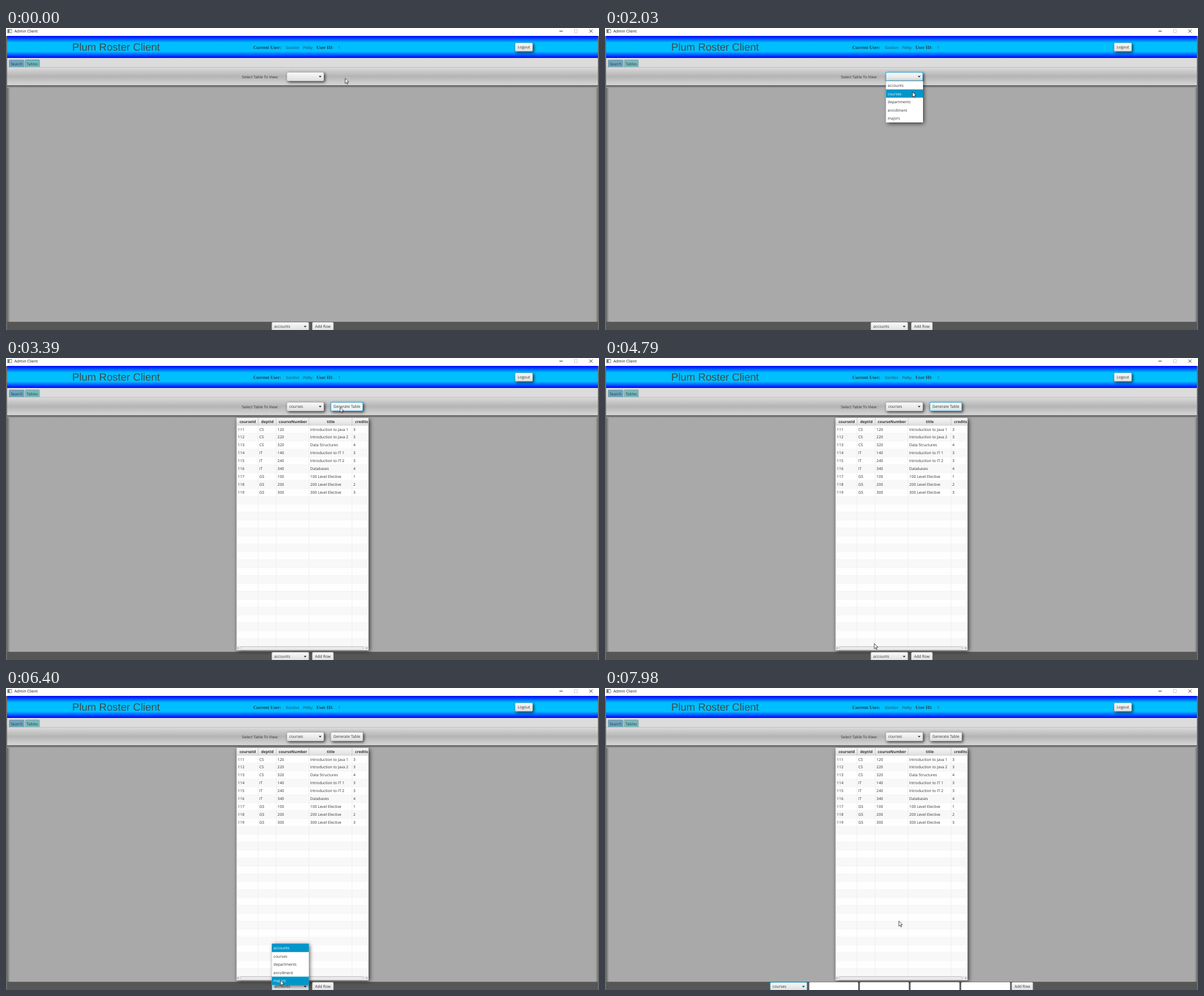
Write an HTML page with a canvas that moves like this. It is 1048 px wide and 534 px high and loops after 8 s.

```html
<!DOCTYPE html>
<html lang="en">
<head>
<meta charset="utf-8">
<title>Admin Client</title>
<style>
  html, body { margin: 0; width: 100%; height: 100%; overflow: hidden; background: #a9a9a9; }
  canvas { display: block; width: 1048px; height: 534px; }
</style>
</head>
<body>
<canvas id="stage" width="1048" height="534"></canvas>
<script>
const ctx = document.getElementById('stage').getContext('2d');
const LOOP = 8000;
const SANS = '"Open Sans", "Noto Sans", sans-serif';
const UI = `6.75px ${SANS}`;
const BOLD = `bold 6.7px ${SANS}`;
const SERIF = 'bold 8.15px "Liberation Serif", serif';
const BLUE = '#0096c9';
const INK = '#333';

const CLICK = { openTop: 1400, pickTop: 2380, generate: 3220, openBottom: 5820, pickBottom: 7190 };

// Pointer waypoints: time, x, y
const PATH = [
  [0, 599, 88.5], [620, 599, 88.5], [1180, 549, 87], [1750, 549, 87], [2020, 543, 112.5],
  [2300, 542, 114], [2570, 542, 114], [3000, 590, 86.5], [3400, 590, 86.5],
  [3960, 432, 263], [3990, 428, 267], [4260, 428, 267], [4790, 475.5, 504.5],
  [5030, 477, 519], [5110, 477, 519], [5500, 482.5, 526], [6200, 482.5, 526],
  [6900, 493.5, 478], [7250, 493.5, 478], [7650, 520, 468], [7950, 527, 441],
  [7980, 519, 411.5], [8000, 519, 411.5]
];
const TABLES = ['accounts', 'courses', 'departments', 'enrollment', 'majors'];
const COLUMNS = [
  { name: 'courseId', x: 408, w: 38 }, { name: 'deptId', x: 446, w: 32 },
  { name: 'courseNumber', x: 478, w: 58 }, { name: 'title', x: 536, w: 76 },
  { name: 'credits', x: 612, w: 33 }
];
const COURSES = [
  ['CS', 120, 'Introduction to Java 1', 3], ['CS', 220, 'Introduction to Java 2', 3],
  ['CS', 320, 'Data Structures', 4], ['IT', 140, 'Introduction to IT 1', 3],
  ['IT', 240, 'Introduction to IT 2', 3], ['IT', 340, 'Databases', 4],
  ['GS', 100, '100 Level Elective', 1], ['GS', 200, '200 Level Elective', 2],
  ['GS', 300, '300 Level Elective', 3]
];

function rect(x, y, w, h, fill) {
  ctx.fillStyle = fill;
  ctx.fillRect(x, y, w, h);
}

function round(x, y, w, h, r, fill) {
  ctx.fillStyle = fill;
  ctx.beginPath();
  ctx.roundRect(x, y, w, h, r);
  ctx.fill();
}

function gradient(x0, y0, x1, y1, ...stops) {
  const g = ctx.createLinearGradient(x0, y0, x1, y1);
  stops.forEach(([at, color]) => g.addColorStop(at, color));
  return g;
}

function text(label, x, y, font = UI, color = INK, align = 'left') {
  ctx.font = font;
  ctx.fillStyle = color;
  ctx.textAlign = align;
  ctx.fillText(label, x, y);
}

function polygon(points, fill, stroke) {
  ctx.beginPath();
  points.forEach(([x, y]) => ctx.lineTo(x, y));
  ctx.closePath();
  if (fill) { ctx.fillStyle = fill; ctx.fill(); }
  if (stroke) { ctx.strokeStyle = stroke; ctx.stroke(); }
}

function line(x0, y0, x1, y1, color, width = 1) {
  ctx.strokeStyle = color;
  ctx.lineWidth = width;
  ctx.beginPath();
  ctx.moveTo(x0, y0);
  ctx.lineTo(x1, y1);
  ctx.stroke();
}

function withShadow(blur, offset, draw) {
  ctx.save();
  ctx.shadowColor = 'rgba(0,0,0,.7)';
  ctx.shadowBlur = blur;
  ctx.shadowOffsetX = ctx.shadowOffsetY = offset;
  draw();
  ctx.restore();
}

function control(x, y, w, h, { focus = false, shadow = false, hover = false } = {}) {
  const border = () => round(x, y, w, h, 2, focus ? '#039ed3' : '#b5b5b5');
  if (shadow) withShadow(5, 2, border); else border();
  const bottom = hover ? '#ececec' : '#dedede';
  round(x + 0.8, y + 0.8, w - 1.6, h - 1.6, 1.5, gradient(0, y, 0, y + h, [0, '#fafafa'], [1, bottom]));
}

function button(label, x, y, w, h, options) {
  control(x, y, w, h, options);
  text(label, x + w / 2, y + (h > 15 ? 10.3 : 10), UI, INK, 'center');
}

function combo(label, x, y, h, options) {
  control(x, y, 66, h, options);
  text(label, x + 4.5, y + 10.2);
  const ax = x + 59.2, ay = y + 6.7;
  polygon([[ax - 2.5, ay], [ax + 2.5, ay], [ax, ay + 2.8]], INK);
}

function popup(x, y, mouse, selected) {
  const rowH = 14.6, w = 65.5;
  withShadow(7, 2, () => rect(x, y, w, rowH * TABLES.length, '#fff'));
  line(x + 0.2, y, x + 0.2, y + 73, '#c8c8c8', 0.5);
  const inside = mouse.x >= x && mouse.x <= x + w;
  const hovered = inside ? Math.floor((mouse.y - y) / rowH) : -1;
  TABLES.forEach((name, i) => {
    const lit = i === hovered || i === selected;
    const top = y + i * rowH;
    if (lit) rect(x, top, w, rowH, BLUE);
    if (lit && i === selected) line(x, top + rowH, x + w, top + rowH, '#0a86b4', 0.6);
    text(name, x + 3, top + 9.9, UI, lit ? '#fff' : INK);
  });
}

function drawTitleBar() {
  rect(0, 0, 1048, 14, '#fff');
  rect(2.5, 2, 8, 7, '#777');
  rect(3.2, 3.2, 6.6, 5.1, '#f4f4f4');
  rect(3.2, 3.2, 3, 5.1, '#557b78');
  text('Admin Client', 14.7, 7.7, `6.9px ${SANS}`, '#111');
  line(978, 5.5, 984, 5.5, '#222', 0.9);
  ctx.strokeStyle = '#c8c8c8';
  ctx.strokeRect(1004.5, 2.8, 5.2, 5.2);
  line(1031, 2.7, 1036.6, 8.3, '#222', 0.9);
  line(1036.6, 2.7, 1031, 8.3, '#222', 0.9);
}

function drawHeader() {
  rect(0, 13, 1048, 521, '#6c6c6c');
  rect(2, 14, 1044, 39, gradient(0, 14, 0, 53,
    [0, '#0000ff'], [0.3, '#00bfff'], [0.7, '#00bfff'], [1, '#0000ff']));
  text('Plum Roster Client', 117, 40.3, '18.6px "Liberation Sans", sans-serif', '#3d4a52');
  text('Current User:', 437, 37, SERIF, '#263845');
  text('Gordon', 494.5, 36.5, UI, '#27445a');
  text('Pelby', 525, 36.5, UI, '#27445a');
  text('User ID:', 548.7, 37, SERIF, '#263845');
  text('1', 587, 36.5, UI, '#27445a');
  button('Logout', 899.5, 26, 31.5, 15.5, { shadow: true });
}

function drawTab(label, x, w, color, focus) {
  round(x, 56, w, 13.5, [2, 2, 0, 0], focus ? '#1594bd' : '#8b9da3');
  round(x + 0.8, 56.8, w - 1.6, 12.7, [1.5, 1.5, 0, 0], color);
  text(label, x + w / 2, 65.8, UI, '#2c3c42', 'center');
}

function drawToolbar(t, mouse) {
  rect(2, 53, 1044, 17, '#dcdcdc');
  drawTab('Search', 5, 27.5, '#6da5bd', false);
  drawTab('Tables', 33.5, 26, '#76b9bc', t < CLICK.openTop);
  rect(2, 69, 1044, 33, gradient(0, 69, 0, 102, [0, '#dcdcdc'], [0.5, '#b4b4b4'], [1, '#d8d8d8']));
  line(2, 69.5, 1046, 69.5, '#c0c0c0');
  rect(2, 101.3, 1044, 4.5, gradient(0, 101.3, 0, 105.8, [0, '#484848'], [0.3, '#686868'], [1, '#a9a9a9']));
  text('Select Table To View:', 417, 88.5);

  const picked = t >= CLICK.pickTop;
  combo(picked ? 'courses' : '', 496, 78, 16,
    { shadow: true, focus: t >= CLICK.openTop && t < CLICK.generate });
  if (picked) {
    const hover = mouse.x > 574 && mouse.y > 78 && mouse.y < 94;
    button('Generate Table', 573.7, 78, 57.3, 16,
      { shadow: true, hover, focus: t >= CLICK.generate && t < CLICK.openBottom });
  }
}

function drawBody() {
  rect(2, 102, 1044, 418, '#a9a9a9');
  rect(2, 102, 5, 418, gradient(2, 0, 7, 0, [0, '#686868'], [1, '#a9a9a9']));
  rect(1042, 102, 4, 418, gradient(1042, 0, 1046, 0, [0, '#a9a9a9'], [1, '#787878']));
  rect(2, 519.5, 1044, 14.5, '#565656');
}

function drawTable() {
  const x = 407.3, y = 105.5, w = 233.5, h = 411.5, top = 119, rowH = 13.97;
  withShadow(7, 2, () => rect(x, y, w, h, '#c2c2c2'));
  ctx.save();
  ctx.beginPath();
  ctx.rect(x + 0.5, y + 0.5, w - 1, h - 1);
  ctx.clip();
  rect(x, y, w, h, '#fff');
  rect(x, y, w, top - y, gradient(0, y, 0, top, [0, '#f7f7f7'], [1, '#dedede']));
  for (let i = 0; i < 28; i++) {
    rect(x, top + i * rowH, w, rowH, i % 2 ? '#f8f8f8' : '#fefefe');
    line(x, top + i * rowH, x + w, top + i * rowH, '#f0f0f0', 0.6);
  }
  COLUMNS.forEach((col, i) => {
    if (i) {
      line(col.x - 0.5, y, col.x - 0.5, top, '#c5c5c5', 0.8);
      line(col.x - 0.5, top, col.x - 0.5, 510, '#ebebeb', 0.8);
    }
    text(col.name, col.x + col.w / 2, 115.2, BOLD, INK, 'center');
    COURSES.forEach((course, row) => {
      const value = i ? course[i - 1] : 111 + row;
      text(value, col.x + 1.8, top + row * rowH + 9.5);
    });
  });
  line(x, top, x + w, top, '#c5c5c5', 0.7);
  rect(x, 509.5, w, 7, '#e7e7e7');
  round(413.5, 510.3, 218, 5.2, 2, '#b4b4b4');
  round(414.1, 510.9, 216.8, 4, 1.5, '#ededed');
  ctx.lineWidth = 0.8;
  [[410, -1], [637.5, 1]].forEach(([ax, dir]) => {
    line(ax - dir, 511, ax + dir, 513, '#777', 0.8);
    line(ax + dir, 513, ax - dir, 515, '#777', 0.8);
  });
  ctx.restore();
}

function drawFooter(t) {
  const expanded = t >= CLICK.pickBottom;
  const focus = t >= CLICK.openBottom;
  combo(expanded ? 'courses' : 'accounts', expanded ? 291.5 : 469.5, 520, 15, { focus });
  if (expanded) {
    for (let i = 0; i < 4; i++) {
      round(360.7 + i * 89.5, 520, 87, 15, 2, '#b5b5b5');
      round(361.3 + i * 89.5, 520.6, 85.8, 14.4, 1.5, '#fff');
    }
  }
  button('Add Row', expanded ? 718.5 : 541, 520, 38, 15);
}

function pointerAt(t) {
  const next = Math.max(1, PATH.findIndex(p => p[0] > t));
  const [t0, x0, y0] = PATH[next - 1];
  const [t1, x1, y1] = PATH[next];
  const u = (t - t0) / (t1 - t0);
  const k = u * u * (3 - 2 * u);
  return { x: x0 + (x1 - x0) * k, y: y0 + (y1 - y0) * k };
}

function drawPointer({ x, y }) {
  ctx.save();
  ctx.translate(x + 0.4, y + 0.4);
  ctx.lineWidth = 0.8;
  ctx.lineJoin = 'round';
  polygon([[0, 0], [0, 9.2], [2.1, 7.3], [3.5, 10.6], [4.9, 10], [3.5, 6.8], [6.4, 6.6]], '#fff', '#222');
  ctx.restore();
}

function render(t) {
  const mouse = pointerAt(t);
  ctx.textRendering = 'geometricPrecision';
  ctx.textBaseline = 'alphabetic';
  ctx.lineWidth = 0.8;
  drawHeader();
  drawTitleBar();
  drawBody();
  drawToolbar(t, mouse);
  if (t >= CLICK.generate) drawTable();
  drawFooter(t);
  if (t >= CLICK.openTop && t < CLICK.pickTop) popup(496.5, 94, mouse, -1);
  if (t >= CLICK.openBottom && t < CLICK.pickBottom) popup(469.8, 452, mouse, 0);
  drawPointer(mouse);
}

const start = performance.now();
function tick() {
  render((performance.now() - start) % LOOP);
  requestAnimationFrame(tick);
}
tick();
</script>
</body>
</html>
```
